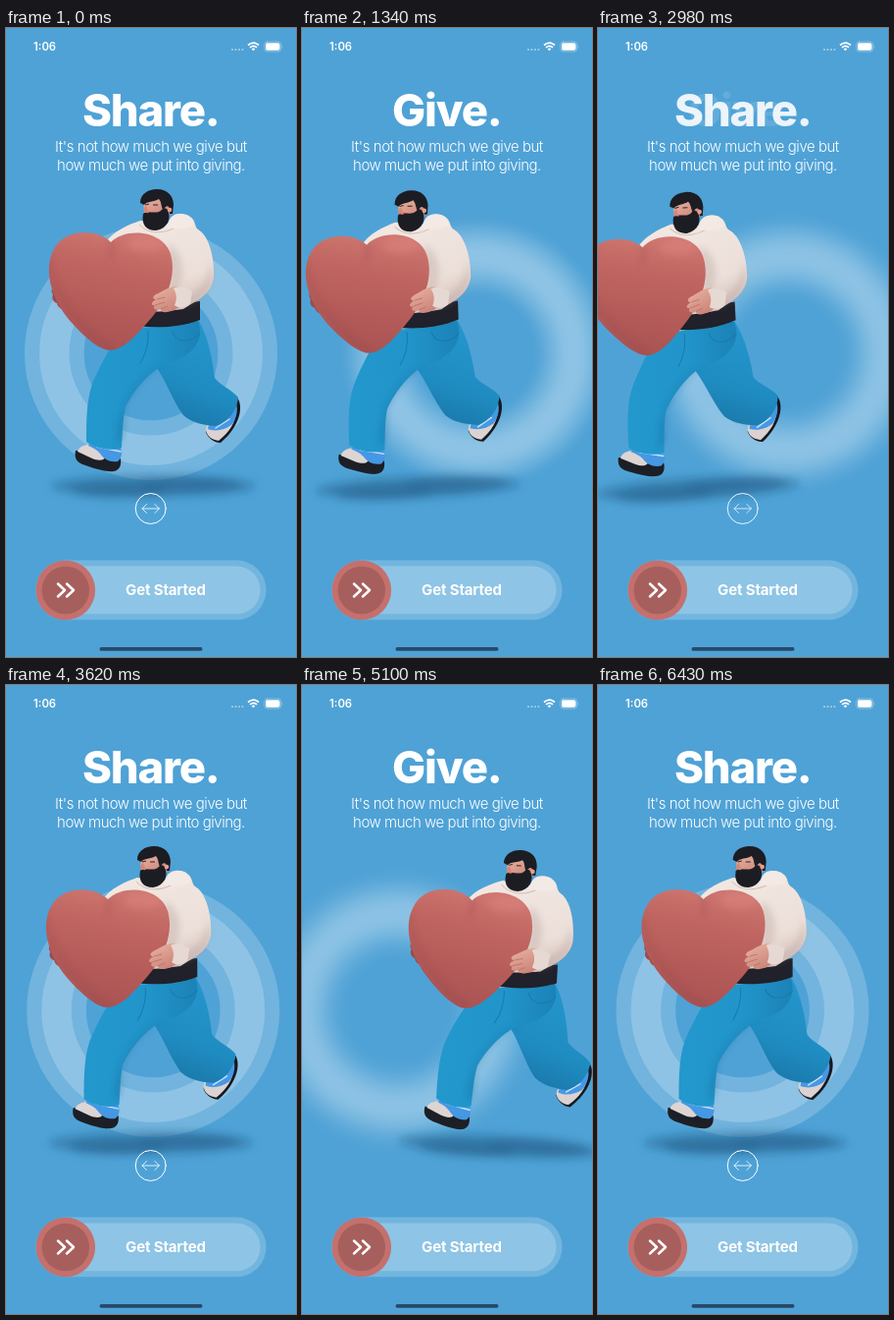
An HTML page that plays this animation: 296 by 640 pixels, repeating every 6.53 s.

```html
<!DOCTYPE html>
<html lang="en">
<head>
<meta charset="utf-8">
<title>Share</title>
<style>
@property --drag { syntax: "<number>"; inherits: true; initial-value: 0; }
@property --rest { syntax: "<number>"; inherits: true; initial-value: 1; }
html, body { margin: 0; width: 100%; height: 100%; overflow: hidden; background: #4fa2d6; }
#stage {
  position: relative; width: 296px; height: 640px; overflow: hidden;
  background: #4fa2d6;
  animation: drag 6530ms infinite, rest 6530ms linear infinite;
}
svg { position: absolute; inset: 0; width: 296px; height: 640px; overflow: visible; }
text { font-family: Inter, Roboto, sans-serif; fill: #fff; }
.mid { text-anchor: middle; }
.title { font-size: 45.5px; font-weight: 800; letter-spacing: -1.2px; }
.lead { font-size: 15px; font-weight: 300; letter-spacing: -.47px; }
.label { font-size: 15px; font-weight: 700; letter-spacing: -.15px; }
.clock { font-size: 11.3px; font-weight: 600; }
.line { fill: none; stroke: #fff; stroke-linecap: round; stroke-linejoin: round; }
#rings {
  transform: translateX(calc(var(--drag) * -1px));
  filter: blur(calc(max(var(--drag), -1 * var(--drag)) * .2px));
}
#runner {
  transform-origin: 148px 331px;
  transform: rotate(calc(var(--drag) * .0659deg)) translateX(calc(var(--drag) * 1.2px));
}
.at-rest { opacity: var(--rest); }
.dragged { opacity: calc(1 - var(--rest)); }

/* Two drags, left then right; each springs home with a one second ease-out. */
@keyframes drag {
  0%, 14.55% { --drag: 0; animation-timing-function: ease-out; }
  35.53% { --drag: -72.5; animation-timing-function: linear; }
  42.27% { --drag: -70; animation-timing-function: ease-out; }
  57.58%, 67.38% { --drag: 0; animation-timing-function: ease-out; }
  83.31% { --drag: 59; animation-timing-function: linear; }
  84.23% { --drag: 59; animation-timing-function: ease-out; }
  99.54%, 100% { --drag: 0; }
}
@keyframes rest {
  0%, 14.55% { --rest: 1; }
  18.38%, 42.27% { --rest: 0; }
  46.09%, 67.84% { --rest: 1; }
  71.67%, 84.23% { --rest: 0; }
  88.06%, 100% { --rest: 1; }
}
</style>
</head>
<body>
<div id="stage">
  <svg id="rings" viewBox="0 0 296 640" fill="none" stroke="#fff" stroke-opacity=".2">
    <circle cx="148" cy="331" r="98.7" stroke-width="30.4"/>
    <circle cx="148" cy="331" r="98.7" stroke-width="60.7"/>
  </svg>

  <svg id="runner" viewBox="0 0 296 640">
    <defs>
      <linearGradient id="heart" x1=".6" y1="0" x2=".4" y2="1">
        <stop offset="0" stop-color="#cf7771"/><stop offset=".3" stop-color="#c06561"/>
        <stop offset=".7" stop-color="#b35a58"/><stop offset="1" stop-color="#a85353"/>
      </linearGradient>
      <linearGradient id="wool" x1=".3" y1="0" x2=".7" y2="1">
        <stop offset="0" stop-color="#f3e8e2"/><stop offset=".7" stop-color="#ecdfd9"/>
        <stop offset="1" stop-color="#d3c0ba"/>
      </linearGradient>
      <linearGradient id="denim">
        <stop offset="0" stop-color="#2398cd"/><stop offset=".55" stop-color="#2195ca"/>
        <stop offset="1" stop-color="#1b82b7"/>
      </linearGradient>
      <linearGradient id="denimBack" x1=".6" y1="0" x2=".3" y2="1">
        <stop offset="0" stop-color="#2497cd"/><stop offset=".6" stop-color="#1f8cc1"/>
        <stop offset="1" stop-color="#1a76a8"/>
      </linearGradient>
      <linearGradient id="skin" x1="0" y1="0" x2=".6" y2="1">
        <stop offset="0" stop-color="#eab6a4"/><stop offset="1" stop-color="#cb8479"/>
      </linearGradient>
      <filter id="soft" x="-50%" y="-100%" width="200%" height="300%"><feGaussianBlur stdDeviation="5"/></filter>
      <filter id="haze" x="-50%" y="-50%" width="200%" height="200%"><feGaussianBlur stdDeviation="3"/></filter>
      <clipPath id="heartClip"><use href="#heartShape"/></clipPath>
    </defs>

    <g fill="#1d5780" filter="url(#soft)">
      <ellipse cx="150" cy="466" rx="104" ry="11" opacity=".45"/>
      <ellipse cx="116" cy="471" rx="50" ry="7" opacity=".4"/>
      <ellipse cx="188" cy="464" rx="52" ry="7" opacity=".35"/>
    </g>

    <!-- far hand -->
    <path fill="#9d4a4c" d="M54 261C47 260 45 268 48 271C46 276 49 279 52 280C53 286 60 288 66 286V261Z"/>

    <!-- back shoe and leg -->
    <path fill="#16181f" d="M235 375C243 383 240 404 219 422C212 422 206 417 204 411L226 385Z"/>
    <path fill="#dbd2d1" d="M205 405C202 412 208 419 217 420C228 411 234 402 235 390L222 392Z"/>
    <path fill="#4598e4" d="M207 403L233 377C238 386 236 397 230 404C223 409 214 411 206 408Z"/>
    <path class="line" stroke-width="1.4" opacity=".7" d="M214 407L228 398"/>
    <path fill="url(#denimBack)" d="M148 312L197 298C208 318 211 341 213 356C219 364 231 368 237 376C236 389 227 401 214 405C202 404 190 402 181 394C169 378 162 354 148 338Z"/>

    <!-- front shoe and leg -->
    <path fill="#1d1f26" d="M71 430C69 440 74 443 84 446C93 449 103 452 110 451C116 450 118 445 117 438L95 431Z"/>
    <path fill="#ddd5d3" d="M73 431C75 424 86 422 94 426L101 437C99 441 93 440 88 438Z"/>
    <path fill="#4598e4" d="M86 421L117 427C119 433 118 438 114 441C106 442 100 439 96 433C93 429 88 427 84 425Z"/>
    <path class="line" stroke-width="1.4" opacity=".7" d="M93 426L117 431"/>
    <path fill="url(#denim)" d="M117 308L196 298C204 319 188 336 164 341C146 350 130 369 122 386C119 399 119 413 118 427C107 431 92 428 82 421C82 398 82 373 91 355C98 340 106 326 117 308Z"/>
    <path fill="#125f91" opacity=".3" filter="url(#haze)" d="M166 339C149 347 129 368 121 390L120 415L113 425C112 395 121 370 148 347Z"/>
    <path class="line" stroke-width="1" style="stroke:#1a79ab" d="M170 309C174 321 188 321 198 311M145 308C146 321 142 333 137 341"/>

    <!-- belt of the dark shirt, then sweater -->
    <path fill="#20212a" d="M135 286L198 278L198 297C180 304 156 306 134 303Z"/>
    <path fill="url(#wool)" d="M102 218C109 207 125 200 137 196L166 199C168 190 181 186 188 192C194 196 192 202 196 205C207 211 213 233 212 254C210 267 201 275 187 282L181 286C166 288 148 290 138 288L110 250Z"/>
    <path fill="#ad958f" opacity=".3" filter="url(#haze)" d="M166 219C180 229 184 247 177 262L168 272L164 250Z"/>
    <path fill="#a88f8a" opacity=".25" filter="url(#haze)" d="M207 235C209 261 195 269 178 276L181 284C201 277 212 266 211 246Z"/>
    <path fill="#f3eae6" d="M163 203C167 196 167 190 176 189C185 188 192 194 191 201C184 205 174 205 163 203Z"/>
    <path fill="none" stroke="#d0bfb9" d="M136 200C144 209 158 210 171 204"/>

    <!-- head -->
    <path fill="url(#skin)" d="M141 177L162 171L168 181V190L146 194C140 190 140 183 141 177Z"/>
    <path fill="#1c1d23" d="M137 178C137 169 145 164 154 164C165 164 171 171 171 180L170 189H167C168 182 165 179 162 183L161 187C158 182 159 177 156 174C151 177 144 176 141 180Z"/>
    <path fill="#1c1d23" d="M140 189C144 185 151 189 156 187C159 186 161 181 165 185C169 194 165 204 153 206C143 206 138 200 140 189Z"/>
    <path fill="#d98474" d="M143 181C139 184 140 189 146 188Z"/>
    <circle cx="167" cy="185" r="2.3" fill="#e3a08f"/>
    <path fill="none" stroke="#292529" d="M142 180L146 179M150 180L155 180"/>

    <!-- heart -->
    <path id="heartShape" fill="url(#heart)" d="M107 218C95 205 63 203 50 223C36 246 47 279 69 302C83 317 96 328 107 328C119 327 130 316 144 300C162 281 175 254 168 230C161 206 122 202 107 218Z"/>
    <g clip-path="url(#heartClip)">
      <g filter="url(#haze)">
        <path fill="none" stroke="#8c4146" stroke-width="5" opacity=".25" d="M43 232C45 268 72 300 107 328"/>
        <path fill="none" stroke="#8c4146" stroke-width="5" opacity=".25" d="M107 215C109 223 108 229 106 235"/>
        <ellipse cx="143" cy="220" rx="19" ry="8" fill="#e28c83" opacity=".35"/>
      </g>
    </g>

    <!-- near hand and cuff -->
    <path fill="url(#skin)" d="M176 263C167 262 160 268 153 271C148 274 151 277 154 276C147 279 148 283 152 282C149 286 153 288 158 286C158 291 166 289 172 287L180 282Z"/>
    <path fill="none" stroke="#b76e67" stroke-width=".8" d="M154 276L162 274M152 282L162 279M158 286L165 283"/>
    <path fill="#e6d8d2" d="M171 265C175 262 183 263 190 268L188 281C183 286 175 285 172 282C175 276 174 270 171 265Z"/>
  </svg>

  <svg viewBox="0 0 296 640">
    <text class="clock" x="28" y="23">1:06</text>
    <g fill="#fff">
      <g opacity=".5">
        <circle cx="231" cy="22" r="1"/><circle cx="234.5" cy="22" r="1"/>
        <circle cx="238" cy="22" r="1"/><circle cx="241.5" cy="22" r="1"/>
      </g>
      <path d="M252.5 23.2L250.6 21.2Q252.5 19.7 254.4 21.2Z"/>
      <rect x="265" y="15.3" width="14.5" height="7.4" rx="1.8"/>
      <path d="M281.6 17.3Q283 19 281.6 20.7Z" opacity=".5"/>
    </g>
    <path class="line" stroke-width="1.7" style="stroke-linecap:butt" d="M247 17.5Q252.5 12.7 258 17.5M249 19.8Q252.5 16.8 256 19.8"/>
    <rect class="line" x="263.7" y="14" width="17.1" height="10" rx="3" stroke-width=".8" opacity=".4"/>

    <text class="title mid at-rest" x="147.8" y="100.3">Share.</text>
    <text class="title mid dragged" x="147.8" y="100.3">Give.</text>
    <text class="lead mid" x="148" y="126">It's not how much we give but</text>
    <text class="lead mid" x="148" y="145">how much we put into giving.</text>

    <g class="line at-rest" stroke-width="1">
      <circle cx="147.7" cy="489" r="15.5"/>
      <path stroke-width=".8" d="M139 489H156.4M143.5 484.5L139 489L143.5 493.5M151.9 484.5L156.4 489L151.9 493.5"/>
    </g>

    <g fill="#fff" fill-opacity=".2">
      <rect x="30.4" y="541.6" width="235.2" height="60.7" rx="30.35"/>
      <rect x="36.4" y="547.6" width="223.2" height="48.7" rx="24.35"/>
    </g>
    <text class="label mid" x="163" y="577">Get Started</text>
    <circle cx="60.8" cy="572" r="30.3" fill="#c4706d"/>
    <circle cx="60.8" cy="572" r="24.3" opacity=".15"/>
    <path class="line" stroke-width="2.5" d="M53 565.5L60 572L53 578.5M62 565.5L69 572L62 578.5"/>
    <rect x="95.5" y="630" width="105" height="3.8" rx="1.9" fill="#27496a"/>
  </svg>
</div>
</body>
</html>
```
